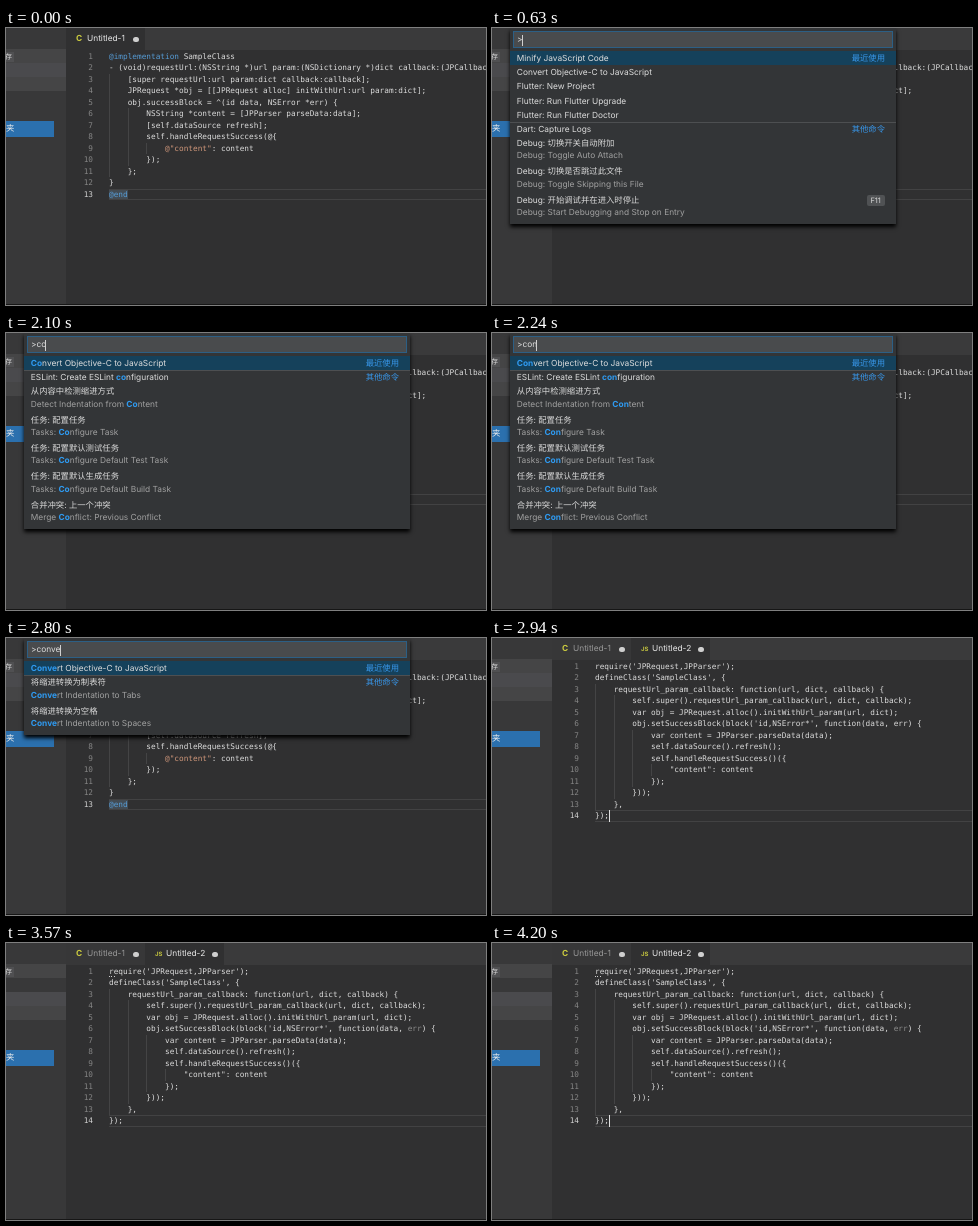
Animation of 480 by 277 pixels, one loop 4.27 s. Source, as an HTML page:

```html
<!DOCTYPE html>
<html lang="zh-CN">
<head>
<meta charset="utf-8">
<title>Convert to JavaScript</title>
<style>
  html, body { margin: 0; width: 100%; height: 100%; overflow: hidden; background: #303031; }
  #stage {
    position: relative; width: 480px; height: 277px; overflow: hidden; background: #303031;
    font: 8.35px/14.15px Inter, "Noto Sans CJK SC", "Noto Sans CJK", sans-serif;
    color: #dcdcdc; white-space: pre; text-rendering: geometricPrecision;
  }
  #stage div, #stage i, #stage em { position: absolute; font-style: normal; }
  .off { visibility: hidden; }

  .side { left: 0; top: 0; width: 60px; height: 277px; background: #383839; overflow: hidden; }
  .side div { left: 0; width: 60px; height: 14px; }
  .head { background: #454546; }
  #picked { background: #4a4a4d; }
  #stage .badge { left: 0; top: 24px; width: 8px; height: 10px; background: #505052; font-size: 7px; line-height: 10px; text-indent: -1px; }
  #stage #button { width: 47.5px; height: 16px; line-height: 16px; background: #2b70ae; color: #eee; }

  .tabs { left: 60px; top: 0; width: 420px; height: 22px; background: #3a3a3b; }
  .tab { top: 0; height: 22px; line-height: 23px; width: 79px; background: #373738; color: #979797; }
  .tab.active { background: #303031; color: #e6e6e6; }
  .tab b { position: absolute; left: 10px; color: #c9c93f; }
  .tab span { position: absolute; left: 21px; }
  .tab i { left: 67.3px; top: 8.6px; width: 5.6px; height: 5.6px; border-radius: 50%; background: #cfcfcf; }
  .tab.js b { font-size: 6px; }

  .code { left: 0; top: 22.5px; width: 480px; height: 254px; overflow: hidden;
    font: 7.75px/11.53px "DejaVu Sans Mono", monospace; }
  .line { left: 103px; height: 11.53px; }
  .num { left: 60px; width: 27px; text-align: right; color: #858585; }
  .num.now { color: #d0d0d0; }
  .now-box { left: 103px; width: 377px; height: 9.5px; border: solid #424243; border-width: 1px 0; }
  .guide { width: 1px; height: 11.6px; background: #444445; }
  .kw { color: #569cd6; }
  .str { color: #d0977b; }
  .word { background: #434c54; }
  .caret { width: 1px; background: #e0e0e0; }
  .dim { color: #8c8c8c; }
  .dots { left: 103px; top: 10px; width: 6px; height: 1px;
    background: repeating-linear-gradient(90deg, #d0d0d0 0 1px, transparent 1px 2.4px); }

  .palette { left: 17.5px; top: 0; width: 386.5px; background: #333537; box-shadow: 0 2.5px 4px #000; }
  .input { left: 3px; top: 3px; width: 379px; height: 16px; border: 1px solid #2c5f85; box-sizing: content-box; background: #494b4d;
    width: 378px; height: 15px; }
  .input span { position: absolute; left: 3.5px; top: 1px; }
  #stage .input .caret { top: 1.5px; margin-left: -1px; height: 11px; background: #d0d0d0; }
  .row { left: 0; width: 100%; }
  .row.sel { background: #15415b; }
  .row.rule { box-shadow: inset 0 1px #4d4f51; }
  .row span { position: absolute; left: 7.3px; top: 1.2px; }
  .row .sub { top: 13.6px; color: #a0a0a0; }
  .row b { color: #2f9af0; }
  .row em { right: 11px; top: 1.2px; color: #3897ea; }
  .row i { right: 11.3px; top: 2px; width: 18px; height: 11px; border-radius: 2px;
    background: #505254; font-size: 7.4px; line-height: 11px; text-align: center; }
  .bar { right: 0; top: 23px; width: 6.5px; height: 14px; background: #506f84; }
  .edge { left: 0; top: 276px; width: 480px; height: 1px; background: #161616; }
</style>
</head>
<body>
<div id="stage">
  <div class="side">
    <div class="head" style="top:21px"></div>
    <div class="badge">存</div>
    <div id="picked"></div>
    <div class="head" id="folder"></div>
    <div id="button">夹</div>
  </div>
  <div class="tabs">
    <div class="tab active" data-show="0 2940"><b>C</b><span>Untitled-1</span><i></i></div>
    <div class="tab" data-show="2940 4270"><b>C</b><span>Untitled-1</span><i></i></div>
    <div class="tab active js" style="left:79px" data-show="2940 4270"><b>JS</b><span>Untitled-2</span><i></i></div>
  </div>
  <div class="code" id="objc" data-show="0 2940"></div>
  <div class="code" id="js" data-show="2940 4270"></div>
  <div class="edge"></div>
</div>
<script>
const LOOP = 4270, PITCH = 11.53, CHAR = 4.666, ROW = 14.15;
const stage = document.getElementById('stage');
const byId = id => document.getElementById(id);

const objc = `<span class="kw">@implementation</span> SampleClass
- (void)requestUrl:(NSString *)url param:(NSDictionary *)dict callback:(JPCallback)callback {
    [super requestUrl:url param:dict callback:callback];
    JPRequest *obj = [[JPRequest alloc] initWithUrl:url param:dict];
    obj.successBlock = ^(id data, NSError *err) {
        NSString *content = [JPParser parseData:data];
        [self.dataSource refresh];
        self.handleRequestSuccess(@{
            <span class="str">@"content"</span>: content
        });
    };
}
<span class="kw word">@end</span>`;

const js = `require('JPRequest,JPParser');
defineClass('SampleClass', {
    requestUrl_param_callback: function(url, dict, callback) {
        self.super().requestUrl_param_callback(url, dict, callback);
        var obj = JPRequest.alloc().initWithUrl_param(url, dict);
        obj.setSuccessBlock(block('id,NSError*', function(data, <span id="err">err</span>) {
            var content = JPParser.parseData(data);
            self.dataSource().refresh();
            self.handleRequestSuccess()({
                "content": content
            });
        }));
    },
});`;

function fillCode(id, text) {
  const lines = text.split('\n'), last = lines.length - 1;
  let html = `<div class="now-box" style="top:${last * PITCH}px"></div>`;
  lines.forEach((line, n) => {
    const top = `top:${n * PITCH}px`;
    const indent = line.search(/\S/);
    for (let c = 0; c < indent; c += 4)
      html += `<div class="guide" style="left:${103 + c * CHAR}px;${top}"></div>`;
    html += `<div class="num${n === last ? ' now' : ''}" style="${top}">${n + 1}</div>`;
    html += `<div class="line" style="${top}">${line}</div>`;
  });
  byId(id).innerHTML = html;
}
fillCode('objc', objc);
fillCode('js', js);
byId('js').insertAdjacentHTML('beforeend',
  `<div class="dots" data-show="3360 4270"></div>
   <div class="caret" style="left:117px;top:${13 * PITCH}px;height:11.5px" data-show="2940 3570,4060 4270"></div>`);

// Each row: text, second line, right-hand label, key badge
const RECENT = '最近使用', OTHER = '其他命令';
const allCommands = [
  ['Minify JavaScript Code', '', RECENT],
  ['Convert Objective-C to JavaScript'],
  ['Flutter: New Project'],
  ['Flutter: Run Flutter Upgrade'],
  ['Flutter: Run Flutter Doctor'],
  ['Dart: Capture Logs', '', OTHER],
  ['Debug: 切换开关自动附加', 'Debug: Toggle Auto Attach'],
  ['Debug: 切换是否跳过此文件', 'Debug: Toggle Skipping this File'],
  ['Debug: 开始调试并在进入时停止', 'Debug: Start Debugging and Stop on Entry', '', 'F11']
];
const conCommands = [
  ['Convert Objective-C to JavaScript', '', RECENT],
  ['ESLint: Create ESLint configuration', '', OTHER],
  ['从内容中检测缩进方式', 'Detect Indentation from Content'],
  ['任务: 配置任务', 'Tasks: Configure Task'],
  ['任务: 配置默认测试任务', 'Tasks: Configure Default Test Task'],
  ['任务: 配置默认生成任务', 'Tasks: Configure Default Build Task'],
  ['合并冲突: 上一个冲突', 'Merge Conflict: Previous Conflict']
];
const convCommands = [
  ['Convert Objective-C to JavaScript', '', RECENT],
  ['将缩进转换为制表符', 'Convert Indentation to Tabs', OTHER],
  ['将缩进转换为空格', 'Convert Indentation to Spaces']
];

function mark(text, typed) {
  const at = text.search(/con/i);
  if (!typed || at < 0) return text;
  const end = at + typed.length;
  return `${text.slice(0, at)}<b>${text.slice(at, end)}</b>${text.slice(end)}`;
}

function addPalette(typed, rows, from, to, caretShow, extra = '') {
  let y = 23, list = '';
  rows.forEach(([text, sub, label, key], n) => {
    const h = sub ? 2 * ROW : ROW;
    const kind = n === 0 ? ' sel' : label === OTHER ? ' rule' : '';
    list += `<div class="row${kind}" style="top:${y}px;height:${h}px"><span>${mark(text, typed)}</span>` +
      (sub ? `<span class="sub">${mark(sub, typed)}</span>` : '') +
      (label ? `<em>${label}</em>` : '') + (key ? `<i>${key}</i>` : '') + '</div>';
    y += h;
  });
  stage.insertAdjacentHTML('beforeend',
    `<div class="palette" style="height:${y + 3}px" data-show="${from} ${to}">
      <div class="input"><span>&gt;${typed}<i class="caret" data-show="${caretShow || from + ' ' + to}"></i></span></div>${list}${extra}</div>`);
}
addPalette('', allCommands, 490, 2030, '490 1080,1610 2030', '<div class="bar" data-show="1120 2030"></div>');
addPalette('c', conCommands, 2030, 2100);
addPalette('co', conCommands, 2100, 2240);
addPalette('con', conCommands, 2240, 2380);
addPalette('conv', convCommands, 2380, 2450);
addPalette('conve', convCommands, 2450, 2870);

const timed = [...document.querySelectorAll('[data-show]')].map(el => ({
  el, spans: el.dataset.show.split(',').map(s => s.split(' ').map(Number))
}));
const isOn = (spans, t) => spans.some(([a, b]) => t >= a && t < b);

function draw() {
  const t = performance.now() % LOOP;
  for (const { el, spans } of timed) el.classList.toggle('off', !isOn(spans, t));
  byId('err').classList.toggle('dim', t >= 3360);

  // The sidebar list grows by one row once the second file opens
  const grow = 14 * Math.min(1, Math.max(0, (t - 3010) / 140));
  byId('picked').style.top = 35 + grow + 'px';
  byId('folder').style.top = 49 + grow + 'px';
  byId('button').style.top = 93 + grow + 'px';
  requestAnimationFrame(draw);
}
draw();
</script>
</body>
</html>
```
